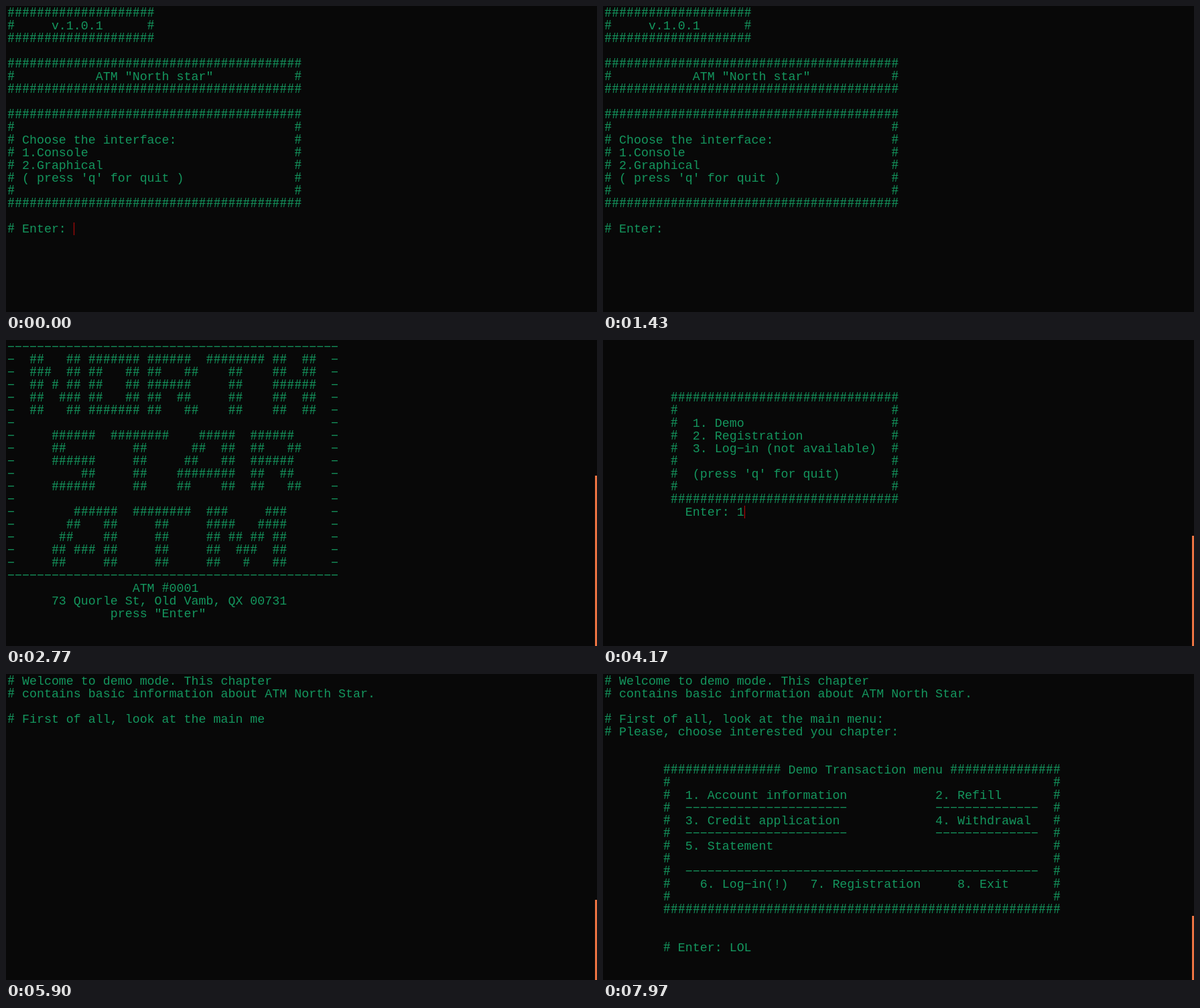
Recreate the animation shown at these times as an HTML page with a canvas. Size 882 by 458 pixels, loop 8 s.

```html
<!DOCTYPE html>
<html lang="en">
<head>
<meta charset="utf-8">
<title>ATM console</title>
<style>
  html, body { margin: 0; width: 100%; height: 100%; overflow: hidden; background: #080808; }
  canvas { display: block; }
</style>
</head>
<body>
<canvas id="stage" width="882" height="458"></canvas>
<script>
const ctx = document.getElementById('stage').getContext('2d');
const W = 882, H = 458, LOOP = 8000;
const CELL = 10.98, LINE = 19, LEFT = 2, BASE = 16;
const TEXT_FONT = '18.3px "Liberation Mono", "Courier New", monospace';
const HASH_FONT = '20px "Liberation Serif", "Times New Roman", serif';

const LETTERING = [
  '   ##   ## ####### ######  ######## ##  ##',
  '   ###  ## ##   ## ##   ##    ##    ##  ##',
  '   ## # ## ##   ## ######     ##    ######',
  '   ##  ### ##   ## ##  ##     ##    ##  ##',
  '   ##   ## ####### ##   ##    ##    ##  ##',
  '',
  '      ######  ########    #####  ######',
  '      ##         ##      ##  ##  ##   ##',
  '      ######     ##     ##   ##  ######',
  '          ##     ##    ########  ##  ##',
  '      ######     ##    ##    ##  ##   ##',
  '',
  '         ######  ########  ###     ###',
  '        ##   ##     ##     ####   ####',
  '       ##    ##     ##     ## ## ## ##',
  '      ## ### ##     ##     ##  ###  ##',
  '      ##     ##     ##     ##   #   ##'
];

const FOOTER = [
  [19, 17, 'ATM #0001'],
  [20, 6, '73 Quorle St, Old Vamb, QX 00731'],
  [21, 14, 'press "Enter"']
];

const INTRO = [
  [0, 0, '# Welcome to demo mode. This chapter'],
  [1, 0, '# contains basic information about ATM North Star.'],
  [3, 0, '# First of all, look at the main menu:'],
  [4, 0, '# Please, choose interested you chapter:']
];

// Times at which the caret switches between shown and hidden.
const BLINKS = [270, 870, 1430, 1900, 2770, 3370, 4000, 4170, 4730, 5230, 5840, 6400, 7930];
const caret = { row: 0, col: 0 };

// Draws one pass of a line: either its hashes or everything else.
function drawGlyphs(row, col, text, hashes) {
  ctx.font = hashes ? HASH_FONT : TEXT_FONT;
  const dx = hashes ? 0.5 : 0;
  for (let i = 0; i < text.length; i++) {
    if (text[i] === ' ' || (text[i] === '#') !== hashes) continue;
    // The console's hyphen is as wide as a minus sign.
    const glyph = text[i] === '-' ? '\u2212' : text[i];
    ctx.fillText(glyph, LEFT + dx + (col + i) * CELL, BASE + row * LINE);
  }
}

function put(row, col, text) {
  drawGlyphs(row, col, text, false);
  drawGlyphs(row, col, text, true);
  caret.row = row;
  caret.col = col + text.length;
}

function box(row, col, width, height, edge = '#') {
  put(row, col, edge.repeat(width));
  for (let r = row + 1; r < row + height - 1; r++) {
    put(r, col, edge);
    put(r, col + width - 1, edge);
  }
  put(row + height - 1, col, edge.repeat(width));
}

function type(lines, count) {
  for (const [row, col, text] of lines) {
    if (count < 0) return;
    put(row, col, text.slice(0, count));
    count -= text.length + 1;
  }
}

function interfaceScreen(t) {
  box(0, 0, 20, 3);
  put(1, 6, 'v.1.0.1');
  box(4, 0, 40, 3);
  put(5, 12, 'ATM "North star"');
  box(8, 0, 40, 8);
  put(10, 2, 'Choose the interface:');
  put(11, 2, '1.Console');
  put(12, 2, '2.Graphical');
  put(13, 2, "( press 'q' for quit )");
  put(17, 0, '# Enter: ' + (t >= 1900 ? '1' : ''));
}

function bannerScreen(t) {
  box(0, 0, 45, 19, '-');
  LETTERING.forEach((text, i) => put(i + 1, 0, text));
  type(FOOTER, Math.floor((t - 2155) / 11));
}

function loginScreen(t) {
  box(4, 9, 31, 9);
  put(6, 12, '1. Demo');
  put(7, 12, '2. Registration');
  put(8, 12, '3. Log-in (not available)');
  put(10, 12, "(press 'q' for quit)");
  put(13, 11, 'Enter: ' + (t >= 4170 ? '1' : ''));
}

function demoMenu(t) {
  const title = ' Demo Transaction menu ';
  put(7, 8, '#'.repeat(16) + title + '#'.repeat(15));
  for (let r = 8; r < 18; r++) {
    put(r, 8, '#');
    put(r, 61, '#');
  }
  put(9, 11, '1. Account information');
  put(9, 45, '2. Refill');
  put(11, 11, '3. Credit application');
  put(11, 45, '4. Withdrawal');
  for (const r of [10, 12]) {
    put(r, 11, '-'.repeat(22));
    put(r, 45, '-'.repeat(14));
  }
  put(13, 11, '5. Statement');
  put(15, 11, '-'.repeat(48));
  put(16, 13, '6. Log-in(!)');
  put(16, 28, '7. Registration');
  put(16, 48, '8. Exit');
  put(18, 8, '#'.repeat(54));
  const typed = [7000, 7170, 7330].filter(time => t >= time).length;
  put(21, 8, '# Enter: ' + 'LOL'.slice(0, typed));
}

function demoScreen(t) {
  type(INTRO, Math.max(0, Math.floor((t - 5270) / 5.1)));
  if (t >= 6130) demoMenu(t);
}

const SCREENS = [
  { from: 0, draw: interfaceScreen, thumb: H },
  { from: 2170, draw: bannerScreen, thumb: 203 },
  { from: 3370, draw: loginScreen, thumb: 293 },
  { from: 5230, draw: demoScreen, thumb: 338 },
  { from: 7950, draw: demoScreen, thumb: 362 }
];

function render(t) {
  ctx.fillStyle = '#080808';
  ctx.fillRect(0, 0, W, H);

  ctx.fillStyle = '#14965e';
  ctx.textBaseline = 'alphabetic';
  const screen = SCREENS.filter(s => t >= s.from).pop();
  screen.draw(t);

  if (BLINKS.filter(time => t >= time).length % 2 === 0) {
    ctx.fillStyle = '#c00808';
    ctx.fillRect(Math.round(LEFT + caret.col * CELL), 1 + caret.row * LINE, 1, LINE);
  }
  ctx.fillStyle = '#ec7442';
  ctx.fillRect(879, screen.thumb, 3, H - screen.thumb);
}

const start = performance.now();
function tick() {
  render((performance.now() - start) % LOOP);
  requestAnimationFrame(tick);
}
tick();
</script>
</body>
</html>
```
